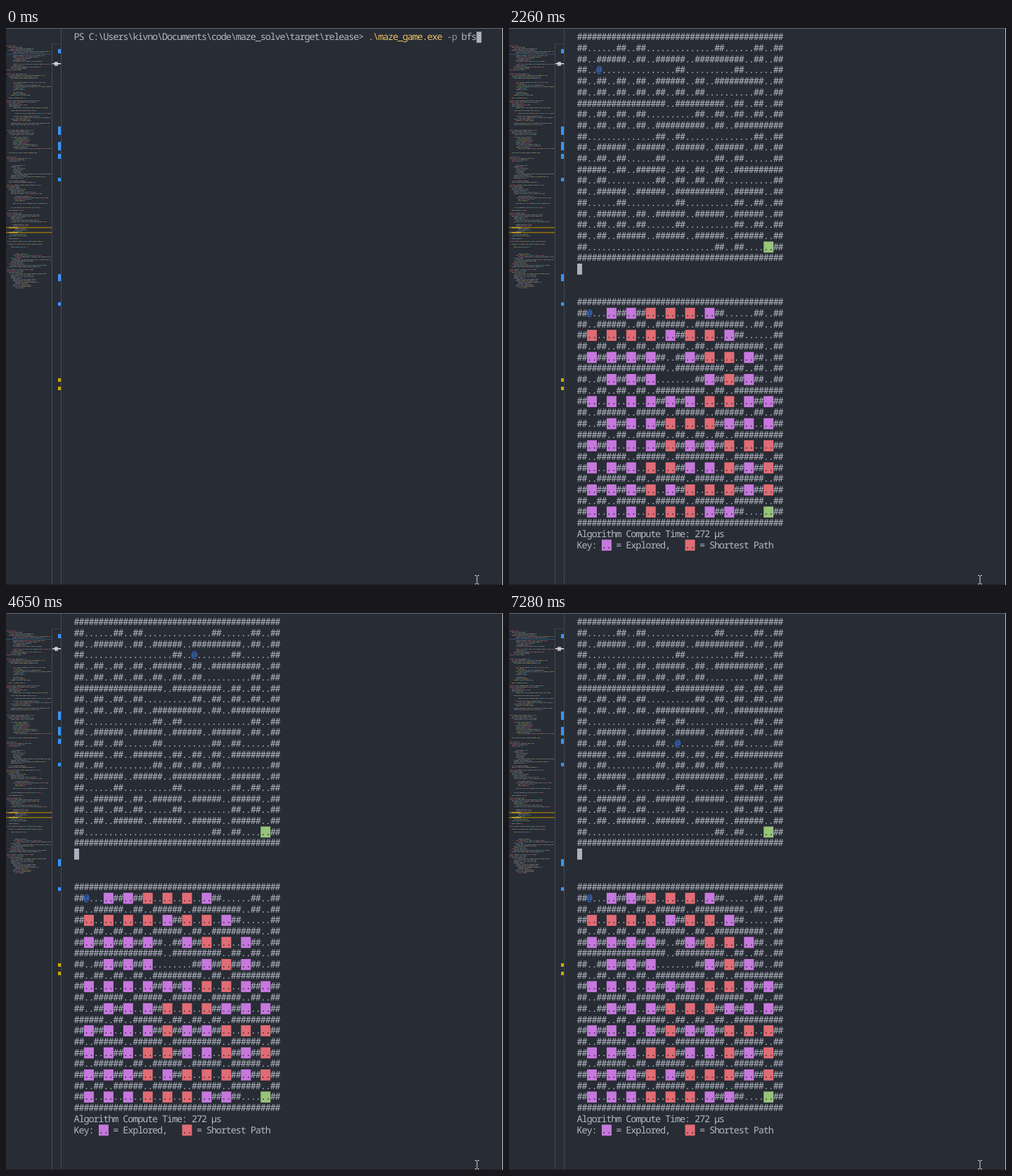
Recreate the animation shown at these times as an HTML page. Size 707 px wide and 792 px high, loop 8 s.

```html
<!DOCTYPE html>
<html lang="en">
<head>
<meta charset="utf-8">
<title>Maze solver terminal</title>
<style>
  html, body { margin: 0; width: 707px; height: 792px; overflow: hidden; background: #282c34; }
  svg { display: block; }
  text {
    font: 13.5px "Noto Sans Mono", "DejaVu Sans Mono", monospace;
    text-anchor: middle;
    white-space: pre;
    text-rendering: geometricPrecision;
  }
</style>
</head>
<body>
<svg id="stage" width="707" height="792" viewBox="0 0 707 792"></svg>
<script>
const LOOP = 8000, CLEAR = 770, SHOW = 810, FIRST_KEY = 1770;
const X0 = 97, Y0 = 5.3, CW = 6.98, CH = 15.7;
const C = {
  bg: '#282c34', text: '#b2b8c4', cursor: '#abb2bf', dim: '#8d939e', yellow: '#e9bd66', blue: '#3b82ff',
  e: '#c678dd', s: '#e06c75', g: '#98c379'
};

const MAZE = [
  '#####################',
  '#...#.#.......#...#.#',
  '#.###.#.###.#####.#.#',
  '#.........#.....#...#',
  '#.#.#.#.###.#.#####.#',
  '#.#.#.#.#.#.#.....#.#',
  '#########.#####.#.#.#',
  '#.#.#.#.....#.#.#.#.#',
  '#.#.#.#.#####.#.#####',
  '#.......#.#.......#.#',
  '#.###.###.###.###.#.#',
  '#.#.#...#.....#.#...#',
  '###.#.###.#.#.#.#####',
  '#.#.....#.#.#.#.....#',
  '#.###.###.#####.###.#',
  '#...#.....#.....#.#.#',
  '#.###.#.###.###.###.#',
  '#.#.#.#...#.....#.#.#',
  '#.#.###.###.###.###.#',
  '#.............#.#...#',
  '#####################'
];
// One line per odd maze row, one letter per odd cell: explored, shortest, goal
const MARKS = [
  '-eessse---', 'ssssesse--', 'eeee-esse-', '-eee--ese-', 'eeeeeessee',
  '-eeessseee', 'eeeeseesss', 'eeesseeses', 'eeesessses', 'eeesssee-g'
];
// Bursts of key presses: start, interval, directions
const KEYS = [
  [FIRST_KEY, 180, 'DD'], [2260, 0, 'R'], [2410, 110, 'RRRR'], [3200, 120, 'RU'],
  [3500, 120, 'URRR'], [4230, 0, 'R'], [4410, 120, 'DDR'], [4830, 120, 'RD'],
  [5130, 60, 'DR'], [5500, 120, 'RD'], [5770, 100, 'DD'], [6320, 0, 'D'],
  [6470, 120, 'LL'], [6740, 120, 'DDLL'], [7280, 0, 'L']
];
const DIRS = { U: [0, -1], D: [0, 1], L: [-1, 0], R: [1, 0] };

const stage = document.getElementById('stage');

function add(parent, tag, attrs) {
  const el = document.createElementNS('http://www.w3.org/2000/svg', tag);
  for (const k in attrs) el.setAttribute(k, attrs[k]);
  return parent.appendChild(el);
}
const group = () => add(stage, 'g', {});
const rect = (parent, x, y, width, height, fill) => add(parent, 'rect', { x, y, width, height, fill });

// Terminal grid helpers
function put(parent, col, row, str, fill = C.text, weight = 400) {
  const x = [...str].map((_, i) => (X0 + (col + i + .5) * CW).toFixed(2)).join(' ');
  add(parent, 'text', { x, y: (Y0 + row * CH + 12).toFixed(1), fill, 'font-weight': weight }).textContent = str;
}
function block(parent, col, row, fill, cols = 1) {
  return rect(parent, X0 + col * CW, Y0 + row * CH, cols * CW, CH, fill);
}
function swatch(parent, col, row, kind) {
  block(parent, col, row, C[kind], 2);
  put(parent, col, row, '..', C.bg);
}
function maze(parent, top) {
  MAZE.forEach((line, r) => put(parent, 0, top + r, line.replace(/./g, '$&$&')));
}
function hero(parent, col, row) {
  block(parent, col, row, C.bg);
  put(parent, col, row, '@', C.blue, 600);
}

// Code overview: functions whose lines indent towards their middle
function drawMinimap() {
  const inks = [C.text, C.text, C.text, C.s, C.yellow, C.g, '#56b6c2'];
  let seed = 11;
  const rnd = () => (seed = seed * 16807 % 2147483647) / 2147483647;
  const map = add(stage, 'g', { opacity: .45 });
  const bodyLines = 20;
  for (let i = 0; i < 174; i++) {
    const phase = i % bodyLines / bodyLines;
    if (phase > .9 || rnd() < .18) continue;
    const indent = 1 + 3 * Math.floor(5 * Math.sin(Math.PI * phase) * (.6 + .4 * rnd()));
    const end = Math.min(64, indent + 12 + 46 * rnd() ** 1.5);
    for (let x = indent; x < end;) {
      const w = Math.min(2 + rnd() * 6, end - x);
      rect(map, x, 23 + i * 2, w, 1, x === 1 ? C.s : inks[rnd() * inks.length | 0]);
      x += w + 1;
    }
  }
  rect(stage, 0, 37, 65, 1, '#2d506e');
  for (const y of [283, 290]) {
    rect(stage, 0, y, 65, 1.5, '#8f700f');
    rect(stage, 4, y, 13, 1.5, '#d0a52a');
  }
}

function drawFrame() {
  drawMinimap();
  rect(stage, 65, 22, 1, 770, '#454a53');
  rect(stage, 65, 22, 13, 1, '#3a3f48');
  rect(stage, 78, 0, 1, 792, '#454a53');
  const edits = [[30, 6], [140, 12], [162, 12], [179, 7], [213, 5], [350, 10], [390, 5]];
  for (const [y, h] of edits) rect(stage, 74, y, 4, h, '#3794ff');
  for (const y of [498, 510]) rect(stage, 74, y, 4, 5, '#cca700');
  rect(stage, 69, 48, 5, 6, '#a9adb3');
  rect(stage, 66, 50, 12, 1.5, '#e4e5e7');
  rect(stage, 0, 0, 707, 1, '#62666d');
  rect(stage, 0, 791, 707, 1, '#1e2127');
  rect(stage, 706, 0, 1, 792, '#c9cacc');
}

drawFrame();

const prompt = group();
put(prompt, 0, 0, 'PS C:\\Users\\kivno\\Documents\\code\\maze_solve\\target\\release>');
put(prompt, 60, 0, '.\\maze_game.exe', C.yellow, 700);
put(prompt, 76, 0, '-p', C.dim);
put(prompt, 79, 0, 'bfs');

const game = group();
maze(game, 0);
swatch(game, 38, 19, 'g');
maze(game, 24);
MARKS.forEach((line, i) => [...line].forEach((kind, j) => {
  if (kind !== '-') swatch(game, 4 * j + 2, 25 + 2 * i, kind);
}));
hero(game, 2, 25);
put(game, 0, 45, 'Algorithm Compute Time: 272 µs');
put(game, 0, 46, 'Key:');
swatch(game, 5, 46, 'e');
put(game, 8, 46, '= Explored,');
swatch(game, 22, 46, 's');
put(game, 25, 46, '= Shortest Path');
const player = add(game, 'g', {});
hero(player, 0, 0);

const cursor = block(stage, 0, 0, C.cursor);

// Mouse pointer
add(stage, 'path', {
  d: 'M667 778.5h2l1 1 1-1h2M670 779.5v10M667 790.5h2l1-1 1 1h2',
  fill: 'none', stroke: '#d8dade', 'stroke-width': 1
});

const steps = KEYS.flatMap(([start, gap, dirs]) =>
  [...dirs].map((d, i) => ({ at: start + i * gap, move: DIRS[d] })));

function cellAt(t) {
  return steps.filter(s => s.at <= t)
    .reduce(([x, y], { move: [dx, dy] }) => [x + dx, y + dy], [1, 1]);
}
function cursorAt(t) {
  if (t < CLEAR) return [82, 0];
  if (t < SHOW) return [0, 6];
  return [0, t < FIRST_KEY ? 47 : 21];
}

const moveTo = (el, col, row) => el.setAttribute('transform', `translate(${col * CW} ${row * CH})`);
const show = (el, on) => el.setAttribute('visibility', on ? 'visible' : 'hidden');

function draw() {
  const t = performance.now() % LOOP;
  const [x, y] = cellAt(t);
  show(prompt, t < CLEAR);
  show(game, t >= SHOW);
  moveTo(player, x * 2, y);
  moveTo(cursor, ...cursorAt(t));
  requestAnimationFrame(draw);
}
draw();
</script>
</body>
</html>
```
